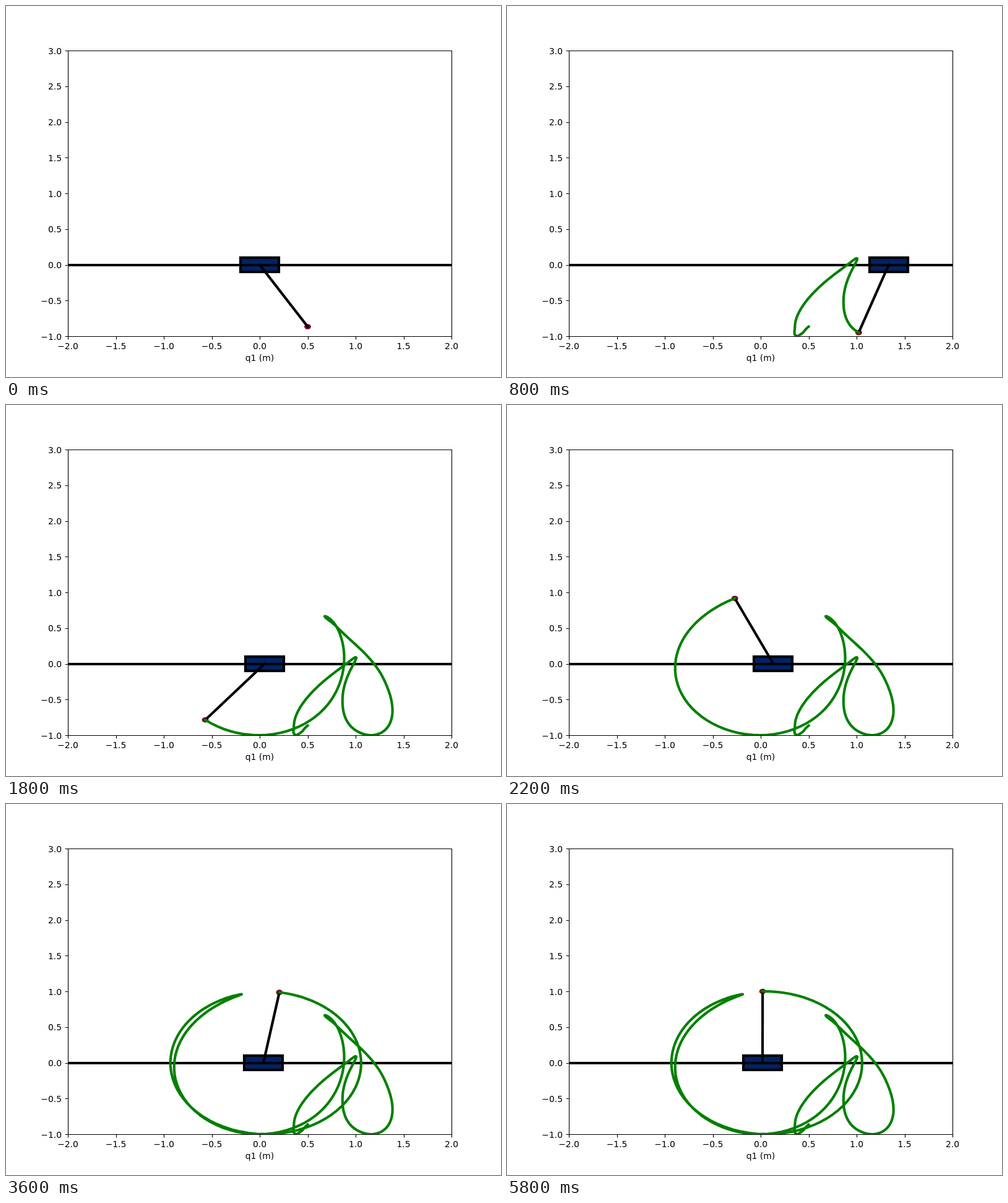
Recreate the animation shown at these times as an HTML page. Size 800 px wide and 600 px high, loop 6 s.

```html
<!DOCTYPE html>
<html lang="en">
<head>
<meta charset="utf-8">
<title>Cart and pendulum</title>
<style>
  html, body { margin: 0; width: 100%; height: 100%; overflow: hidden; background: #fff; }
  svg { display: block; width: 800px; height: 600px; }
  text { font: 13.89px "DejaVu Sans", sans-serif; fill: #000; }
  .thick { stroke: #000; stroke-width: 4.17; fill: none; }
</style>
</head>
<body>
<svg viewBox="0 0 800 600">
  <clipPath id="plot"><rect x="100" y="72" width="620" height="462"/></clipPath>
  <g clip-path="url(#plot)">
    <rect id="cart" class="thick" y="407" width="62" height="23" style="fill:#002366"/>
    <ellipse id="bob" rx="4.65" ry="3.5" fill="#800020" stroke="#800020" stroke-width="1.6"/>
    <path class="thick" d="M100 419H720"/>
    <path id="rod" class="thick" stroke-linecap="square"/>
    <path id="trail" fill="none" stroke="#008000" stroke-width="4.17" stroke-linecap="square" stroke-linejoin="round"/>
  </g>
  <g id="axes" stroke-width="1.11"></g>
</svg>
<script>
const STEP_MS = 200, STEPS = 30, SUBSTEPS = 24;
const ORIGIN_X = 410, ORIGIN_Y = 418.5, UNIT_X = 155, UNIT_Y = 115.5;
const $ = id => document.getElementById(id);

// Each swing: step and angle (degrees from hanging) where the pendulum rests,
// then the step at which it next passes the bottom
const swings = [
  { rest: 0, angle: 30, bottom: .95 },
  { rest: 2.55, angle: -95.2, bottom: 4.18 },
  { rest: 6.5, angle: 131.8, bottom: 8.67 },
  { rest: 11.9, angle: -163.8, bottom: 14.96 },
  { rest: 23.7, angle: 179.95 }
];

// Cart key positions: step, x
const cartKeys = [
  [0, 410], [.5, 424], [.95, 472], [1.26, 546], [2.17, 704], [2.55, 719.4],
  [3.5, 680], [4, 617], [5, 458], [5.5, 411], [6, 399.5], [7, 403], [8, 390.5],
  [9, 418], [10, 432], [12, 423.5], [15, 420], [18, 416], [22, 413]
];

// Large-amplitude pendulum: tan(phi / 4) grows as cosh(time) away from rest,
// phi being the angle from upright; it reaches 1 at the bottom
function angleAt(step) {
  const i = swings.findIndex(s => !(step > s.bottom));
  const { rest, angle, bottom } = swings[i];
  const t = bottom ? step : Math.min(step, rest);
  const nearBottom = t < rest || !bottom ? swings[i - 1].bottom : bottom;
  const u = (t - rest) / (nearBottom - rest);
  const start = Math.tan((180 - Math.abs(angle)) * Math.PI / 720);
  const phi = 4 * Math.atan(start * Math.cosh(Math.acosh(1 / start) * u));
  return Math.sign(angle) * (Math.PI - phi);
}

// Smooth cubic curve through uneven keys, at rest at both ends
function spline(keys) {
  const last = keys.length - 1;
  const rate = i => (keys[i + 1][1] - keys[i][1]) / (keys[i + 1][0] - keys[i][0]);
  const slopes = keys.map(([t], i) => {
    if (i === 0 || i === last) return 0;
    const before = t - keys[i - 1][0], after = keys[i + 1][0] - t;
    return (rate(i - 1) * after + rate(i) * before) / (before + after);
  });
  return time => {
    const t = Math.min(time, keys[last][0]);
    let i = 0;
    while (t > keys[i + 1][0]) i++;
    const [[t0, a], [t1, b]] = keys.slice(i, i + 2);
    const h = t1 - t0, u = (t - t0) / h, w = 1 - u;
    return a * w * w * (1 + 2 * u) + b * u * u * (3 - 2 * u)
      + h * u * w * (slopes[i] * w - slopes[i + 1] * u);
  };
}

const cartAt = spline(cartKeys);

function bobAt(step) {
  const a = angleAt(step);
  return [cartAt(step) + UNIT_X * Math.sin(a), ORIGIN_Y + UNIT_Y * Math.cos(a)];
}

const trailPoints = Array.from({ length: (STEPS - 1) * SUBSTEPS + 1 },
  (_, i) => bobAt(i / SUBSTEPS).map(v => v.toFixed(2)).join(" "));

function drawAxes() {
  const snap = v => Math.round(v) + .5;
  const label = v => v.toFixed(1).replace("-", "\u2212");
  const text = (x, y, anchor, s) =>
    `<text x="${x}" y="${y}" text-anchor="${anchor}">${s}</text>`;
  let lines = "M100.5 72.5H720.5V534.5H100.5Z", labels = text(410, 574, "middle", "q1 (m)");
  for (let v = -2; v <= 2; v += .5) {
    const x = ORIGIN_X + v * UNIT_X;
    lines += `M${snap(x)} 534.5v4.9`;
    labels += text(x, 555, "middle", label(v));
  }
  for (let v = -1; v <= 3; v += .5) {
    const y = ORIGIN_Y - v * UNIT_Y;
    lines += `M100.5 ${snap(y)}h-4.9`;
    labels += text(90, Math.ceil(y + 5.2), "end", label(v));
  }
  $("axes").innerHTML = `<path d="${lines}" fill="none" stroke="#000"/>${labels}`;
}

function render(ms) {
  const step = Math.floor(ms / STEP_MS) % STEPS;
  const cart = cartAt(step), [x, y] = bobAt(step);
  $("cart").setAttribute("x", Math.round(cart - 31));
  $("bob").setAttribute("cx", x);
  $("bob").setAttribute("cy", y);
  $("rod").setAttribute("d", `M${cart} ${ORIGIN_Y}L${x} ${y}`);
  $("trail").setAttribute("d", step ? "M" + trailPoints.slice(0, step * SUBSTEPS + 1).join("L") : "");
}

drawAxes();
render(0);
let start;
requestAnimationFrame(function tick(now) {
  start ??= now;
  render(Math.max(0, now - start));
  requestAnimationFrame(tick);
});
</script>
</body>
</html>
```
